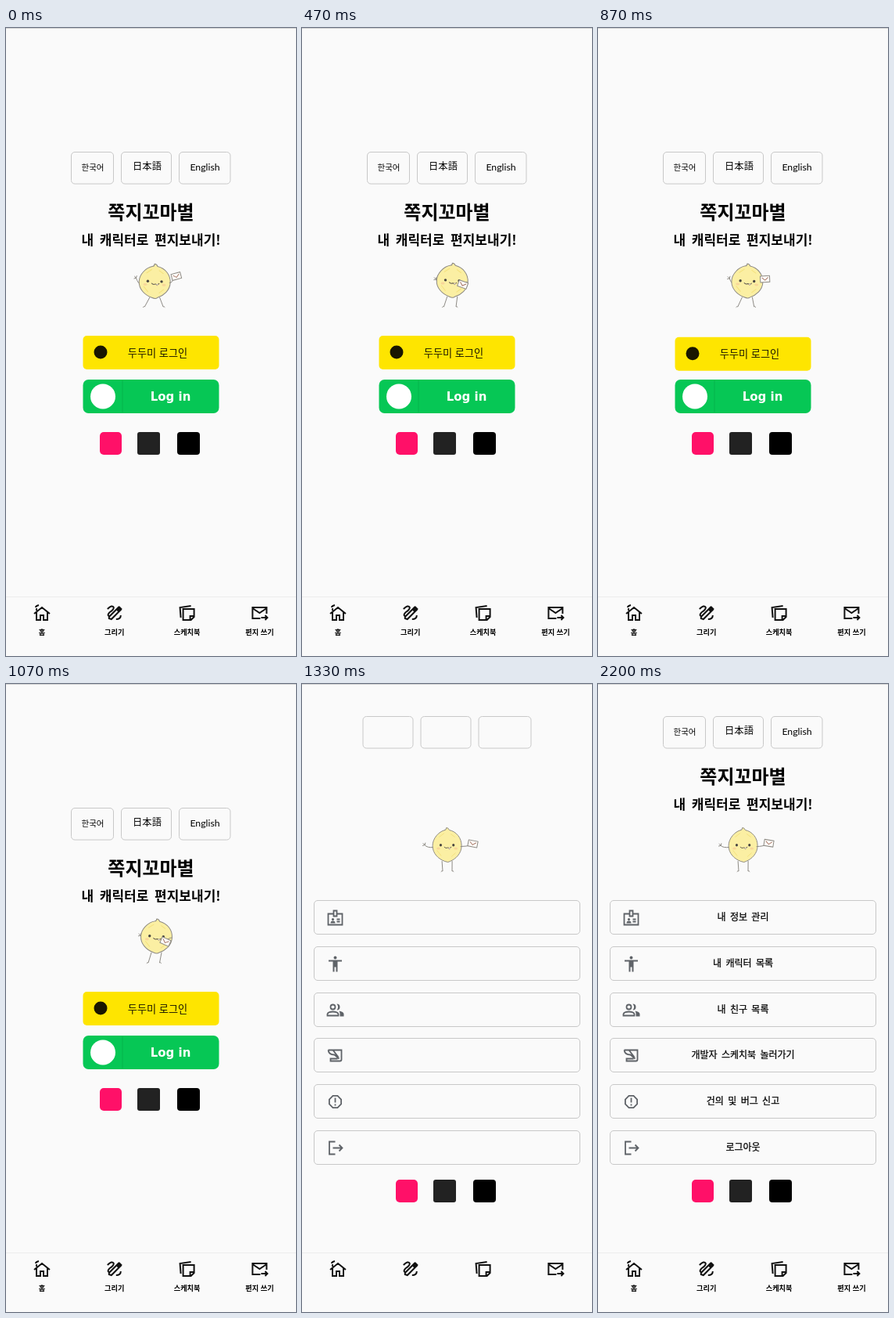
Write an HTML page that moves like this. It is 371 px wide and 802 px high and loops after 2.27 s.

```html
<!DOCTYPE html>
<html lang="ko">
<head>
<meta charset="utf-8">
<style>
  html, body { margin: 0; width: 100%; height: 100%; overflow: hidden; background: #fafafa; }
  svg { display: block; font-family: "Noto Sans CJK KR", "Noto Sans KR", "Noto Sans", sans-serif; }
  .bare text { display: none; }
  .box { fill: none; stroke: #c8c8c8; }
  .icon { fill: none; stroke: #111; stroke-width: 2; }
  .solid { fill: #111; }
  .menu .icon { stroke: #5f6368; stroke-width: 1.8; }
  .menu .solid { fill: #5f6368; }
  .menu text { word-spacing: 2px; stroke: #000; stroke-width: .25; }
  .pencil { fill: none; stroke: #8d8a84; stroke-linecap: round; stroke-linejoin: round; }
</style>
</head>
<body>
<svg id="stage" width="371" height="802" viewBox="0 0 371 802"></svg>
<script>
const LOOP = 2270, TICK = 200 / 3, SWING = 670;
const MENU_AT = 1270, TEXT_AT = 1470, LIFT = 117;

const text = (s, x, y, size, weight = 400, extra = '') =>
  `<text x="${x}" y="${y + size * 0.36}" font-size="${size}" font-weight="${weight}" text-anchor="middle" ${extra}>${s}</text>`;
const rect = (x, y, w, h, r, attrs) =>
  `<rect x="${x}" y="${y}" width="${w}" height="${h}" rx="${r}" ${attrs}/>`;
const icon = (x, y, [lines, solid = '']) =>
  `<g transform="translate(${x - 12} ${y - 12})"><path class="icon" d="${lines}"/><path class="solid" d="${solid}"/></g>`;
const dot = (x, y, r) => `M${x - r} ${y}a${r} ${r} 0 1 0 ${2 * r} 0a${r} ${r} 0 1 0 ${-2 * r} 0`;

const nav = [
  ['홈', ['M2 13L12 5 22 13M5 11V21H10V15H14V21H19V11M5 9V6M4 5Q4 3 8 2']],
  ['그리기', ['M3 7Q9 1 11 5Q11 8 6 11Q2 15 5 16M14 20Q20 20 20 15M5 19L8 20 20 8 17 5 5 17Z', 'M14 8L18 3 22 7 17 11Z']],
  ['스케치북', ['M7 7H21V17L17 21H7ZM16 21V16H21M4 18L3 5 17 3']],
  ['편지 쓰기', ['M13 19H3V5H21V13M3 6L12 12 21 6M14 18H22M19 15L22 18 19 21']]
];
const menu = [
  ['내 정보 관리', ['M10 7H3V21H21V7H14M10 3H14V10H10ZM14 14H18M14 17H18', dot(9, 14, 1.6) + 'M6 19Q6 16 9 16T12 19Z']],
  ['내 캐릭터 목록', ['', dot(12, 4, 2) + 'M3.5 7H20.5V9H15V22H13V16H11V22H9V9H3.5Z']],
  ['내 친구 목록', [dot(9, 8, 3) + 'M2 19V17Q3 14 9 14T16 17V19Z', 'M14 4A4 4 0 1 1 14 12Q17 8 14 4M17 13Q23 14 23 17V20H18V17Q18 15 17 13']],
  ['개발자 스케치북 놀러가기', ['M9 5H20V17Q20 19 18 19H6V16H15M3 5Q4 11 11 11L17 16M3 5H9L16 14']],
  ['건의 및 버그 신고', ['M9 4.4H15L19.6 9V15L15 19.6H9L4.4 15V9ZM12 7V13M12 15V17']],
  ['로그아웃', ['M12 4H4.5V20H12M9 12H21M17 8L21 12 17 16']]
];

const stage = document.getElementById('stage');
stage.innerHTML = `
  <path d="M0 .5H371" stroke="#d5d5d5"/>
  <g id="head">
    <g id="langs"></g>
    ${text('한국어', 111, 178, 10.5, 500)}
    ${text('日本語', 180.5, 177, 12.3, 400, 'lang="ja"')}
    ${text('English', 254.5, 178, 12.3, 400, 'font-family="Lato, sans-serif"')}
    ${text('쪽지꼬마별', 185.5, 235, 24, 700)}
    ${text('내 캐릭터로 편지보내기!', 185.5, 271, 17, 700, 'style="word-spacing:3px"')}
    <g id="lemon"></g>
  </g>
  <g id="login">
    <g id="press">
      ${rect(98.5, 393, 174, 43, 5, 'fill="#fee500"')}
      <circle cx="121" cy="414" r="8.5" fill="#191600"/>
      ${text('두두미 로그인', 194, 415, 13.2, 400, 'fill="#191600"')}
    </g>
    ${rect(98.5, 449, 174, 43, 7, 'fill="#06c755"')}
    <path d="M149 450V491" stroke="#05b54d"/>
    <circle cx="124" cy="470.5" r="16" fill="#fff"/>
    ${text('Log in', 210.5, 471, 15, 700, 'fill="#fff" font-family="DejaVu Sans, sans-serif"')}
  </g>
  <g id="menu" class="menu">${menu.map(([label, art], i) => {
    const y = Math.round(276 + i * 58.8) + .5;
    return rect(15.5, y, 340, 43, 4.5, 'class="box"') + icon(42.5, y + 22, art) + text(label, 185.5, y + 21.5, 12, 500);
  }).join('')}</g>
  <g id="social">
    ${rect(120, 516, 28, 29, 5, 'fill="#ff1068"')}
    ${rect(168, 516, 29, 29, 3, 'fill="#222"')}
    ${rect(219, 516, 29, 29, 4, 'fill="#000"')}
  </g>
  <path d="M0 726.5H371" stroke="#ececec"/>
  ${nav.map(([label, art], i) => {
    const x = 46 + i * 92.8;
    return icon(x, 747, art) + text(label, x, 772, 9.2, 700);
  }).join('')}`;

const part = Object.fromEntries(
  ['head', 'langs', 'lemon', 'login', 'press', 'menu', 'social'].map(id => [id, document.getElementById(id)]));

// arms and legs open and close together
function wavePose(t) {
  const open = .5 + .5 * Math.cos((t - 60) / SWING * 2 * Math.PI);
  return {
    x: 192.5 - 2.5 * open, y: 323 + 1.5 * open, wide: 20, tilt: 3 - open,
    hand: { x: 172 - 6 * open, y: 321 - 2 * open },
    letter: { x: 204 + 15 * open, y: 329 - 13 * open, turn: 24 - 42 * open },
    feet: [182 - 5 * open, 196.5 + 5 * open]
  };
}

function standPose(t) {
  const sway = Math.sin((t - 1330) / SWING * 2 * Math.PI);
  return {
    x: 185.6, y: 323.5, wide: 18.5, tilt: 0,
    hand: { x: 157, y: 322.5 + sway * .8 },
    letter: { x: 218.5, y: 321 - sway * .8, turn: 11 - sway * 2 },
    feet: [180, 192]
  };
}

function lemon({ x, y, wide, tilt, hand, letter, feet }) {
  const leg = (side, foot) => `M${x + 6.5 * side} ${y + 20}L${foot} 356q${side} -1 ${side * 2} .5`;
  const face = side => `
    <ellipse cx="${12 * side}" cy="3.5" rx="2.5" ry="1.5" fill="#f8d69a"/>
    <circle cx="${8.8 * side}" cy="-.8" r="1.7" fill="#484541"/>`;
  return `
    <path class="pencil" d="${leg(-1, feet[0])}${leg(1, feet[1])}
      M${x - wide + 1} ${y + 2}Q${hand.x + 3} ${y + 3} ${hand.x} ${hand.y}l-2 -2m2 2l-2.5 .8m2.5 -.8l.8 -2.5"/>
    <g transform="translate(${x} ${y}) rotate(${tilt}) scale(${wide / 20} 1)">
      <path class="pencil" style="fill:#fbefa3"
        d="M-3 -20Q-1 -20 -1 -23Q2 -23 3 -20C13 -18 20 -10 20 0C20 10 12 17 4 20Q2 22 -3 20C-12 17 -20 10 -20 0C-20 -9 -12 -18 -3 -20Z"/>
      <path d="M-11 -11L-4 -16M-14 6L-8 13M5 -15L11 -11M6 14L12 9" stroke="#f4e17d"/>
      ${face(-1)}${face(1)}
      <path d="M-4 1.5Q-2 4 1 2.5Q4 4 6 1.5" fill="none" stroke="#615b50"/>
      <path d="M2 3Q3 6 5 2.5" fill="#fff" stroke="#8a6d58" stroke-width=".6"/>
    </g>
    <path class="pencil" d="M${x + wide - 1} ${y + 1}Q${(x + wide + letter.x) / 2} ${y + 1} ${letter.x - 4} ${letter.y + 2}"/>
    <g transform="translate(${letter.x} ${letter.y}) rotate(${letter.turn})">
      <path class="pencil" style="fill:#fffdf9" d="M-6 -4H6V4H-6Z"/>
      <path d="M-4 -2L0 1.5 4 -2" fill="none" stroke="#a8786a"/>
    </g>`;
}

function draw(now) {
  const t = Math.floor((now % LOOP + 4) / TICK) * TICK;
  const inMenu = t > MENU_AT - 5, bare = inMenu && t < TEXT_AT - 5;
  const shift = (el, y) => el.setAttribute('transform', `translate(0 ${y})`);
  part.login.style.display = inMenu ? 'none' : '';
  part.menu.style.display = inMenu ? '' : 'none';
  stage.classList.toggle('bare', bare);
  shift(part.head, inMenu ? -LIFT : 0);
  shift(part.social, inMenu ? LIFT : 0);
  // the button dips under a tap
  shift(part.press, Math.max(0, 1 - Math.abs(t - 933) / 100) * 5);

  const spans = bare ? [[78, 64], [152, 64], [226, 67]] : [[83.5, 54], [147.5, 64], [221.5, 65.5]];
  part.langs.innerHTML = spans.map(([x, w]) => rect(x, 158.5, w, 40.5, 4.5, 'class="box"')).join('');
  part.lemon.innerHTML = lemon(inMenu ? standPose(t) : wavePose(t < 2 * TICK ? 0 : t));
}

const start = performance.now();
function frame() {
  draw(performance.now() - start);
  requestAnimationFrame(frame);
}
frame();
</script>
</body>
</html>
```
